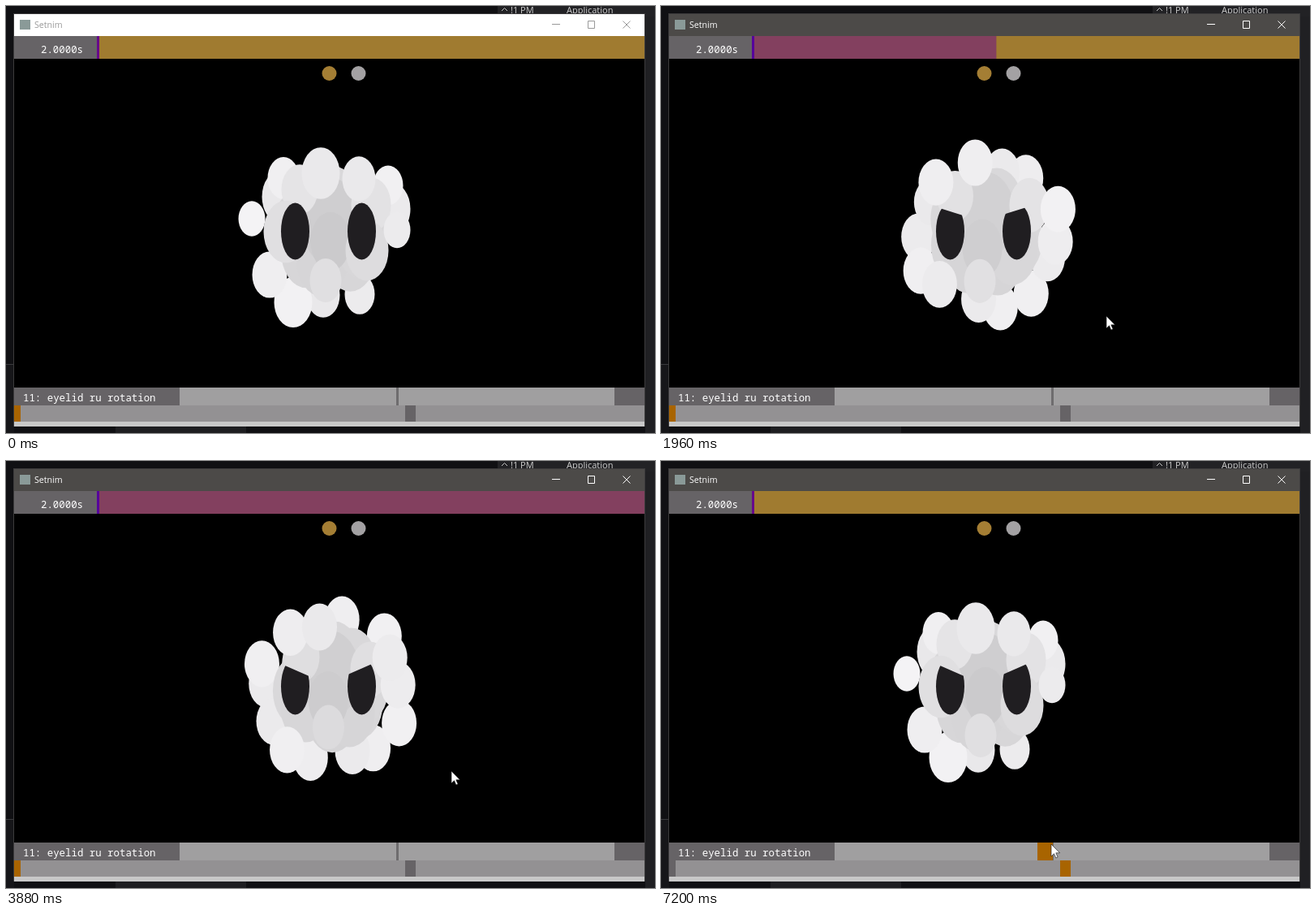
Animation, 800 px wide and 526 px high, one loop 7.28 s. Source, as an HTML page:

```html
<!DOCTYPE html>
<html lang="en">
<head>
<meta charset="utf-8">
<title>Setnim</title>
<style>
html, body { margin: 0; width: 100%; height: 100%; overflow: hidden; background: #141417; }
svg { display: block; width: 800px; height: 526px; }
.ui { font: 11px "Open Sans", "Noto Sans", sans-serif; }
.mono { font: 12.4px "Noto Sans Mono", "DejaVu Sans Mono", monospace; fill: #fff; white-space: pre; }
</style>
</head>
<body>
<svg viewBox="0 0 800 526">
  <defs>
    <clipPath id="lidL"><path id="cutL"/></clipPath>
    <clipPath id="lidR"><path id="cutR"/></clipPath>
  </defs>

  <!-- desktop behind the window -->
  <rect width="800" height="526" fill="#101013"/>
  <rect x="606" width="194" height="13" fill="#222225"/>
  <rect x="788" y="13" width="12" height="513" fill="#202023"/>
  <rect y="441" width="10" height="85" fill="#161619"/>
  <rect y="441" width="10" height="1" fill="#3a3a3d"/>
  <rect x="135" y="518" width="161" height="8" fill="#1e1e21"/>
  <path d="M611 6l3.5-3.5 3.5 3.5" fill="none" stroke="#c8c8c8"/>
  <g class="ui" fill="#cfcfcf">
    <text x="622" y="9">!1 PM</text>
    <text x="691" y="9">Application</text>
  </g>

  <!-- window -->
  <rect x="9" y="9" width="779" height="509" fill="#3c3b3c"/>
  <rect x="10" y="37" width="777" height="433"/>
  <rect id="title" x="10" y="10" width="777" height="27"/>
  <rect x="17" y="17" width="13" height="12" fill="#8a9a98"/>
  <g id="caption">
    <text class="ui" x="35" y="27" style="font-size:10.6px">Setnim</text>
    <path d="M673 22.5h10M717.5 18.5h8v9h-8zM760.5 18.5l9 9M769.5 18.5l-9 9" fill="none" stroke="currentColor"/>
  </g>

  <!-- time bar -->
  <rect x="10" y="37" width="103" height="28" fill="#666366"/>
  <rect x="115" y="37" width="672" height="28" fill="#a07b30"/>
  <rect id="played" x="115" y="37" height="28" fill="#83405f"/>
  <rect id="head" x="112" y="37" width="3" height="28"/>
  <text class="mono" x="43" y="58">2.0000s</text>
  <circle cx="398.5" cy="83" r="9" fill="#a47e34"/>
  <circle cx="434.5" cy="83" r="9" fill="#a3a1a3"/>

  <g id="fluff"></g>
  <g fill="#201e21">
    <ellipse cx="356.5" cy="277.5" rx="17.5" ry="35" clip-path="url(#lidL)"/>
    <ellipse cx="438.5" cy="277.5" rx="17.5" ry="35" clip-path="url(#lidR)"/>
  </g>

  <!-- value slider and key strip -->
  <rect x="10" y="470" width="777" height="22" fill="#666366"/>
  <rect x="214" y="470" width="536" height="22" fill="#a09fa0"/>
  <rect x="481" y="470" width="3" height="22" fill="#6e6c6e"/>
  <rect id="value" x="464" y="470" width="19" height="22" fill="#a86400"/>
  <text class="mono" x="21" y="487">11: eyelid ru rotation</text>
  <rect x="10" y="492" width="777" height="20" fill="#939193"/>
  <rect id="hover" y="492" width="7" height="20" fill="#61009a"/>
  <rect id="keyA" x="10" y="492" width="8" height="20"/>
  <rect id="keyB" x="492" y="492" width="13" height="20"/>
  <rect x="10" y="512" width="777" height="6" fill="#c8c8c8"/>

  <path id="cursor" d="M0 0v15l3.5-3.3 2.3 5.3 2.3-1-2.3-5.2h4.8z" fill="#fff" stroke="#111" stroke-width=".6"/>
</svg>

<script>
const LOOP = 7280, WAKE = 280, PLAY = 1200, SPAN = 1940, RESET = 4400, PICK = 6320;
const CX = 400, CY = 282, TAU = Math.PI * 2;

// Resting places of the outer puffs (x, y, radius), back to front
const homes = [
  [340, 235, 24], [342, 212, 19], [303, 262, 16], [474, 250, 24], [471, 221, 18],
  [391, 356, 20], [354, 365, 23], [325, 331, 21], [436, 355, 18],
  [445, 301, 26], [482, 276, 16], [345, 278, 27], [388, 206, 23], [435, 213, 20]
];
// Puffs that stay around the face
const face = [[400, 265, 36], [450, 245, 24], [362, 226, 22], [400, 290, 24], [394, 338, 19]];

// Pointer stops: time, x, y
const stops = [[330, 640, 470], [900, 549, 382], [RESET, 549, 382], [5400, 530, 498],
  [5900, 530, 498], [6300, 498, 500], [6900, 481, 472]];

const $ = id => document.getElementById(id);
const set = (el, attrs) => { for (const k in attrs) el.setAttribute(k, attrs[k]); };
const show = (id, on) => set($(id), { visibility: on ? "visible" : "hidden" });
const mix = (a, b, u) => a + (b - a) * u;
const clamp = u => Math.max(0, Math.min(1, u));
const ease = u => u * u * (3 - 2 * u);

// Each outer puff takes the slot on an even ring that suits its resting angle.
const angle = ([x, y]) => (Math.atan2(y - CY, x - CX) + TAU) % TAU;
const byAngle = [...homes].sort((a, b) => angle(a) - angle(b));
const slots = homes.map(h => byAngle.indexOf(h));

function outerPuff([x, y, r], i, s) {
  const k = ease(clamp(s / 0.75)), slot = slots[i];
  const a = slot / homes.length * TAU + 0.1 * Math.sin(slot * 2.4 + s * 2);
  const reach = 86 + 7 * Math.cos(slot * 1.8 + s * 2);
  return [
    mix(x, CX + 2 + reach * Math.cos(a), k),
    mix(y, CY + reach * Math.sin(a), k),
    mix(r, 21, k)
  ];
}

function bodyPuff(i, s) {
  const a = i * 2.4 + s * 0.3;
  return [CX + 40 * Math.cos(a), CY - 4 + 36 * Math.sin(a), 31];
}

function facePuff([x, y, r], i, s) {
  return [x + 4 * Math.sin(s * 1.7 * i), y - 8 * Math.sin(s * 1.4 + i) + 8 * Math.sin(i), r];
}

function puffs(s) {
  const outer = homes.map((h, i) => outerPuff(h, i, s));
  const body = Array.from({ length: 9 }, (_, i) => bodyPuff(i, s));
  const inner = face.map((f, i) => facePuff(f, i, s));
  return [...outer.slice(0, 9), ...body, ...inner, ...outer.slice(9)];
}

const nodes = puffs(0).map(() =>
  $("fluff").appendChild(document.createElementNS("http://www.w3.org/2000/svg", "ellipse")));

// Puffs grow rounder and lighter away from the middle.
function drawFluff(s) {
  puffs(s).forEach(([cx, cy, r], i) => {
    const d = Math.hypot(cx - CX, cy - CY);
    const l = Math.min(245, Math.round(199 + 0.45 * d));
    set(nodes[i], { cx, cy, rx: r + 0.5, ry: r * (1.5 - 0.0018 * d) + 0.5, fill: `rgb(${l},${l - 1},${l + 1})` });
  });
}

function drawLids(p) {
  const y = mix(242, 257.5, p), tilt = 8.7 * p;
  const cut = (x, y, d) => `M${x - 20} ${y - d}L${x + 20} ${y + d}V320H${x - 20}Z`;
  set($("cutL"), { d: cut(356.5, y, tilt) });
  set($("cutR"), { d: cut(438.5, y - 2 * p, -tilt) });
}

function drawPointer(t) {
  let i = 0;
  while (i < stops.length - 2 && t >= stops[i + 1][0]) i++;
  const [t0, x0, y0] = stops[i], [t1, x1, y1] = stops[i + 1];
  const u = ease(clamp((t - t0) / (t1 - t0)));
  const x = mix(x0, x1, u), y = mix(y0, y1, u);
  set($("cursor"), { transform: `translate(${x} ${y})` });
  set($("hover"), { x: x - 4 });
  show("cursor", t >= stops[0][0]);
  show("hover", y > 492 && t < PICK);
}

function draw(t) {
  const active = t >= WAKE, picked = t >= PICK;
  const playing = t >= PLAY && t < RESET;
  const u = playing ? clamp((t - PLAY) / SPAN) : 0;
  const done = u * (1.217 - 0.217 * u);
  const ink = active ? "#fff" : "#999";

  set($("title"), { fill: active ? "#4c4a48" : "#fff" });
  set($("caption"), { fill: ink, color: ink });
  set($("played"), { width: 672 * done });
  set($("head"), { fill: playing ? "#56009c" : "#67088b" });
  drawFluff(done * 2);
  drawLids(picked ? 1 : clamp(done / 0.62));
  show("value", picked);
  set($("keyA"), { fill: picked ? "#666366" : "#a86400" });
  set($("keyB"), { fill: picked ? "#a86400" : "#666366" });
  drawPointer(t);
}

const start = performance.now();
function tick() {
  draw((performance.now() - start) % LOOP);
  requestAnimationFrame(tick);
}
tick();
</script>
</body>
</html>
```
